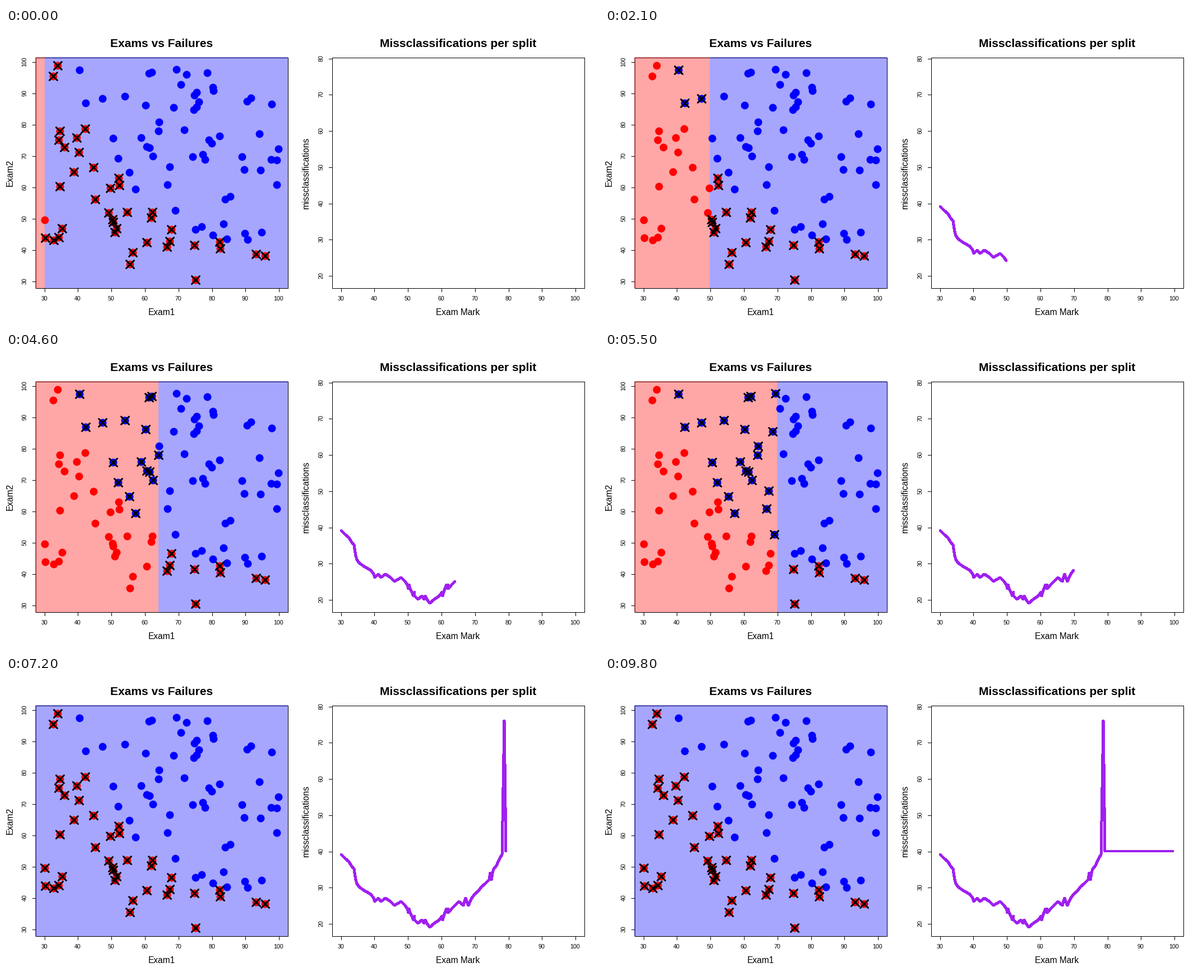
Animation of 1058 by 529 pixels, one loop 9.9 s. Source, as a matplotlib script:

```python
import matplotlib.pyplot as plt
import numpy as np
from matplotlib.animation import FuncAnimation
from matplotlib.markers import MarkerStyle
from matplotlib.patches import Rectangle

W, H, DPI = 1058, 529, 100
PT = 72 / DPI  # points per pixel
FRAMES, STEP = 99, 100
TOP, BOTTOM, LEFT, RIGHT = 52, 464, 52, 502
PANEL = 529

plt.rcParams["font.family"] = "Liberation Sans"

FAILED = np.array([
    (30.06, 49.6), (30.29, 43.9), (32.58, 95.6), (32.72, 43.3), (33.92, 98.9),
    (34.18, 75.2), (34.21, 44.2), (34.52, 60.4), (34.62, 78.0), (35.29, 47.0),
    (35.85, 72.9), (38.79, 65.0), (39.54, 76.0), (40.24, 71.2), (42.08, 78.8),
    (44.67, 66.5), (45.08, 56.3), (49.07, 51.9), (49.59, 59.8), (50.29, 49.8),
    (50.53, 48.9), (51.05, 45.8), (51.55, 46.9), (52.11, 63.1), (52.35, 60.8),
    (54.64, 52.2), (55.48, 35.6), (56.25, 39.3), (60.45, 42.5), (61.83, 50.3),
    (62.22, 52.1), (66.56, 41.1), (67.37, 42.8), (67.95, 46.7), (74.79, 41.6),
    (75.01, 30.6), (82.23, 42.7), (82.37, 40.6), (93.11, 38.8), (95.86, 38.2),
])
PASSED = np.array([
    (60.18, 86.3), (79.03, 75.3), (61.11, 96.5), (75.02, 46.6), (76.10, 87.4),
    (84.43, 43.5), (82.31, 76.5), (69.36, 97.7), (53.97, 89.2), (69.07, 52.7),
    (70.66, 92.9), (76.98, 47.6), (89.68, 65.8), (77.92, 69.0), (62.27, 70.0),
    (80.19, 44.8), (61.38, 72.8), (85.40, 57.1), (52.05, 69.4), (64.18, 80.9),
    (83.90, 56.3), (94.44, 65.6), (77.19, 70.5), (97.77, 86.7), (62.07, 96.8),
    (91.56, 88.7), (79.94, 74.2), (99.27, 61.0), (90.55, 43.4), (97.65, 68.9),
    (74.25, 69.8), (71.80, 78.5), (75.40, 85.8), (40.46, 97.5), (80.28, 92.1),
    (66.75, 61.0), (64.04, 78.0), (72.35, 96.2), (60.46, 73.1), (58.84, 75.9),
    (99.83, 72.4), (47.26, 88.5), (50.46, 75.8), (88.91, 69.8), (94.83, 45.7),
    (67.32, 66.6), (57.24, 59.5), (80.37, 91.0), (68.47, 85.6), (75.48, 90.4),
    (78.64, 96.6), (94.09, 77.2), (90.45, 87.5), (74.49, 84.8), (89.85, 45.4),
    (83.49, 48.4), (42.26, 87.1), (99.32, 68.8), (55.34, 64.9), (74.78, 89.5),
])


def to_x(mark):
    return np.floor(51.75 + 5.979 * (mark - 27.27))


def exam_y(mark):
    return np.floor(464.4 - 5.595 * (mark - 27.87))


def miss_y(count):
    return np.floor(464.4 - 6.474 * (count - 16.64))


# Majority vote on each side of every split; a tie predicts nothing.
marks = np.vstack([FAILED, PASSED])
label = np.repeat([-1, 1], [len(FAILED), len(PASSED)])
ranked = np.sort(marks[:, 0])
splits = (ranked[:-1] + ranked[1:]) / 2


def vote(split):
    low = marks[:, 0] <= split
    sides = np.sign(label[low].sum()), np.sign(label[~low].sum())
    return sides, np.where(low, *sides) != label


votes = [vote(s) for s in splits]
counts = np.array([wrong.sum() for _, wrong in votes])
curve_x, curve_y = PANEL + to_x(splits), miss_y(counts)
dot_x, dot_y = to_x(marks[:, 0]) + 0.5, exam_y(marks[:, 1]) + 0.5

fig = plt.figure(figsize=(W / DPI, H / DPI), dpi=DPI, facecolor="white")
ax = fig.add_axes([0, 0, 1, 1])
ax.set(xlim=(0, W), ylim=(H, 0))
ax.axis("off")


def text(x, y, s, px, **kw):
    ax.text(x, y, s, fontsize=px * PT, ha="center", va="baseline",
            rotation_mode="anchor", **kw)


def hairline(xs, ys):
    ax.plot(xs, ys, color="black", lw=PT, aa=False, zorder=1,
            solid_capstyle="butt")


def panel(dx, title, xlabel, ylabel, y_of, y_ticks):
    l, r, t, b = dx + LEFT + 0.5, dx + RIGHT + 0.5, TOP + 0.5, BOTTOM + 0.5
    ax.add_patch(Rectangle((l, t), r - l, b - t, fill=False, ec="black",
                           lw=PT, aa=False, zorder=1))
    for v in range(30, 101, 10):
        x = dx + to_x(v) + 0.5
        hairline([x, x], [b, b + 6])
        text(x, 487.3, str(v), 10.6)
    for v in y_ticks:
        y = y_of(v) + 0.5
        hairline([l - 6, l], [y, y])
        text(dx + 36.7, y, str(v), 10.6, rotation=90)
    mid = (l + r) / 2
    text(mid, 34.3, title, 21, weight="bold")
    text(mid, 512.8, xlabel, 15.5)
    text(dx + 11.4, (t + b) / 2, ylabel, 15.5, rotation=90)


panel(0, "Exams vs Failures", "Exam1", "Exam2", exam_y, range(30, 101, 10))
panel(PANEL, "Missclassifications per split", "Exam Mark",
      "missclassifications", miss_y, range(20, 81, 10))

zones = [ax.add_patch(Rectangle((LEFT, TOP), 1, BOTTOM + 1 - TOP, lw=0,
                                alpha=0.35, aa=False, zorder=2))
         for _ in range(2)]
for side, color in ((-1, "#ff0000"), (1, "#0000ff")):
    pick = label == side
    ax.plot(dot_x[pick], dot_y[pick], "o", color=color, ms=13.9 * PT, mew=0,
            aa=False, zorder=3)
crosses, = ax.plot([], [], ls="none", color="black", ms=14 * PT, mew=3 * PT,
                   marker=MarkerStyle("x", capstyle="round"), aa=False,
                   zorder=4)
curve, = ax.plot([], [], color="#a020f0", lw=4 * PT, aa=False, snap=False,
                 solid_capstyle="round", solid_joinstyle="round", zorder=4)


def update(i):
    sides, wrong = votes[i]
    edge = to_x(splits[i])
    spans = (LEFT, edge), (edge, RIGHT + 1)
    for zone, side, (x0, x1) in zip(zones, sides, spans):
        zone.set_x(x0)
        zone.set_width(x1 - x0)
        zone.set_facecolor("#0000ff" if side > 0 else "#ff0000")
    crosses.set_data(dot_x[wrong], dot_y[wrong])
    n = i + 1 if i else 0
    curve.set_data(curve_x[:n], curve_y[:n])
    return [*zones, crosses, curve]


anim = FuncAnimation(fig, update, frames=FRAMES, init_func=lambda: update(0),
                     interval=STEP, repeat=True, repeat_delay=0)
plt.show()
```
